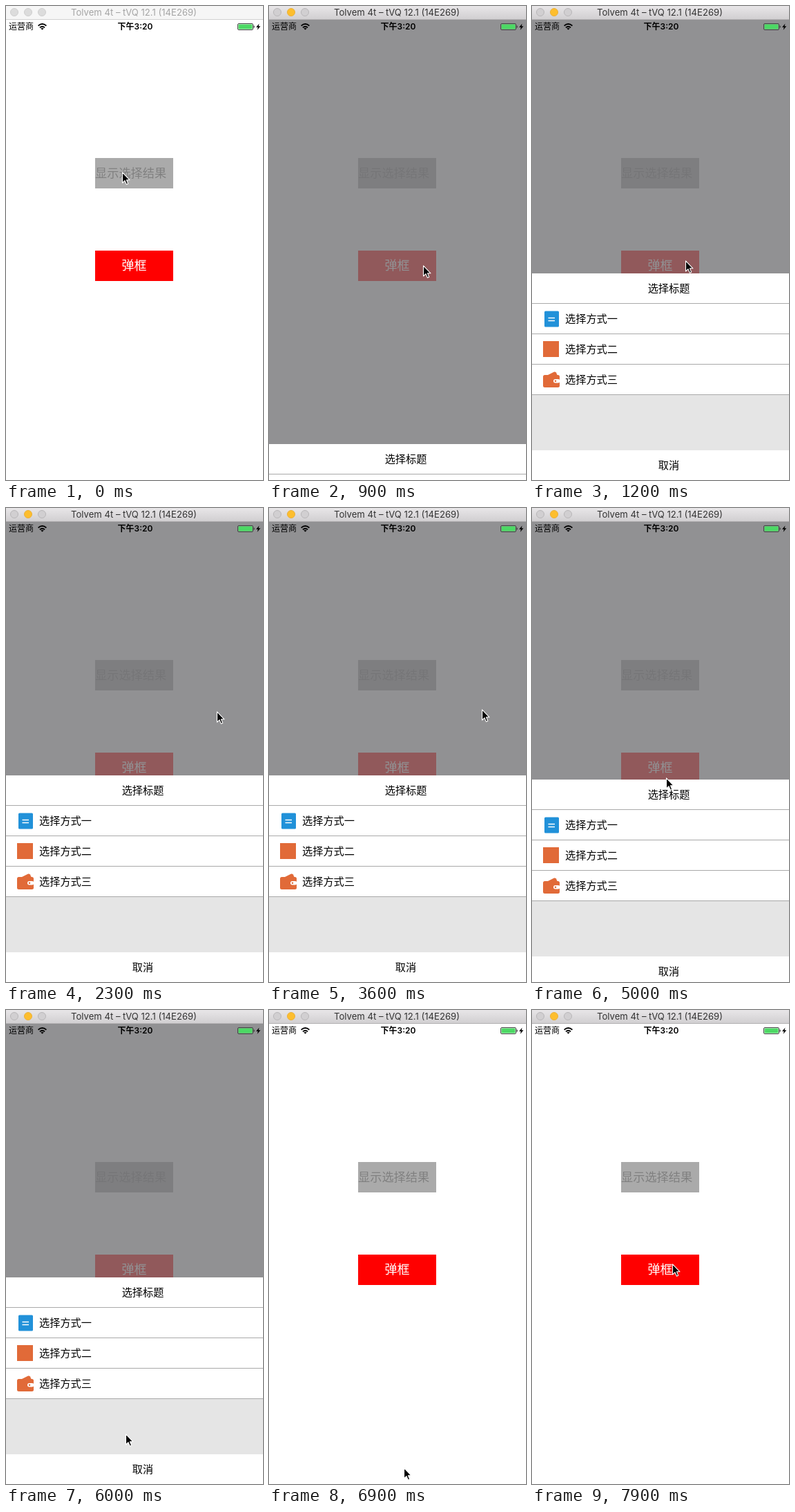
Write an HTML page that moves like this. It is 372 px wide and 686 px high and loops after 8000 ms.

```html
<!DOCTYPE html>
<html lang="zh-CN">
<head>
<meta charset="utf-8">
<title>Action sheet</title>
<style>
  html, body { margin: 0; width: 100%; height: 100%; overflow: hidden; background: #fff; }
  svg { display: block; width: 372px; height: 686px; }
  text { font-family: Inter, "Noto Sans CJK SC", "Noto Sans CJK", sans-serif; font-size: 15.2px; }
  .mid { text-anchor: middle; }
  .title { font-size: 13.1px; }
  .status { font-size: 12px; }
</style>
</head>
<body>
<svg viewBox="0 0 372 686">
  <defs>
    <linearGradient id="chrome" x2="0" y2="1">
      <stop stop-color="#e8e6e8"/>
      <stop offset="1" stop-color="#d0ced0"/>
    </linearGradient>
  </defs>
  <rect width="372" height="686" fill="#fff"/>

  <rect x="129" y="220" width="113" height="44" fill="#aaa"/>
  <text x="129" y="247.500" style="font-size:17.2px;font-weight:300" fill="#808080">显示选择结果</text>
  <rect x="129" y="354" width="113" height="44" fill="#f00"/>
  <text x="185.500" y="382" class="mid" style="font-size:18px;font-weight:300" fill="#fff">弹框</text>

  <rect id="dim" y="20" width="372" height="666" fill="#737375" opacity=".78"/>

  <g id="sheet">
    <rect width="372" height="299" fill="#e5e5e5"/>
    <rect width="372" height="176" fill="#fff"/>
    <rect y="256" width="372" height="43" fill="#fff"/>
    <g id="rows"></g>
    <text x="198" y="27" class="mid">选择标题</text>
    <text x="198" y="283" class="mid">取消</text>

    <rect x="18" y="54.500" width="21" height="23" rx="1.500" fill="#2191d9"/>
    <path d="M23.500 64.500h9.500M23.500 68.500h9.500" stroke="#fff" stroke-width="1.700"/>

    <rect x="16" y="98" width="23" height="23" fill="#e16a38"/>

    <g fill="#e16a38">
      <path d="M23 147L32 142.500Q34 142 35 143.500L36.500 147Z"/>
      <rect x="16" y="147" width="24" height="18" rx="2.500"/>
      <rect x="31" y="153" width="9.500" height="5.500" rx="2.700" fill="#fff"/>
      <circle cx="34" cy="155.700" r="1.300"/>
    </g>
  </g>

  <rect id="bar" width="372" height="20"/>
  <path id="edge" d="M0 19.500H372"/>
  <g id="lights"></g>
  <text id="title" x="185" y="14" class="mid title">Tolvem 4t – tVQ 12.1 (14E269)</text>

  <text x="4" y="34.300" class="status">运营商</text>
  <text x="187" y="34.300" class="mid status" font-weight="600">下午3:20</text>
  <g fill="none" stroke="#000" stroke-width="1.900">
    <path d="M46.600 28.600Q52.500 23.500 58.400 28.600M49 31.300Q52.500 28.300 56 31.300"/>
    <path d="M52.500 34.600L50.300 32.500Q52.500 31 54.700 32.500Z" fill="#000" stroke="none"/>
  </g>
  <rect x="335.500" y="25.500" width="22" height="9" rx="1.500" fill="none" stroke="#444"/>
  <rect x="336.500" y="26.500" width="20" height="7" rx=".5" fill="#4cd964"/>
  <path d="M358.500 28q1.500 .5 1.500 2t-1.500 2Z" fill="#444"/>
  <path d="M366.500 25.500L362 30.700H364.700L363.700 34.700L368.300 29.300H365.500Z"/>

  <path id="cursor" d="M.5 .8V16L4 12.700L6.400 18.200L8.700 17.200L6.500 11.800H11Z"
        stroke="#fff" stroke-width="1.100" stroke-linejoin="round"/>
</svg>
<script>
const LOOP = 8000, STEP = 100;
const SHEET_TOP = 387, SHEET_HEIGHT = 299, SLIDE = 300;
const ACTIVATE = 900;
const OPENINGS = [[820, 3700], [4725, 6800]];

// Cursor waypoints: time, x, y
const CURSOR = [
  [0, 168, 240], [700, 223, 375], [900, 223, 375], [1200, 222, 368], [1500, 222, 368],
  [2400, 308, 291], [3900, 308, 291], [4600, 188, 384], [4700, 188, 384],
  [5000, 194, 390], [5300, 194, 390], [6000, 173, 613], [6400, 195, 662],
  [6900, 195, 662], [7900, 203, 367]
];

const $ = id => document.getElementById(id);
const set = (el, attrs) => {
  for (const key in attrs) el.setAttribute(key, attrs[key]);
};
const add = (parent, tag, attrs, text = '') => {
  const el = document.createElementNS('http://www.w3.org/2000/svg', tag);
  set(el, attrs);
  el.textContent = text;
  return parent.appendChild(el);
};
const clamp = x => Math.min(1, Math.max(0, x));
const ease = p => p * p * (3 - 2 * p);

for (let i = 0; i < 4; i++) {
  const y = 43.5 + 44 * i;
  add($('rows'), 'path', { d: `M0 ${y}H372`, stroke: '#a9a9a9' });
  if (i < 3) add($('rows'), 'text', { x: 48, y: y + 27.5 }, '选择方式' + '一二三'[i]);
}
const lights = [12, 32, 52].map(cx => add($('lights'), 'circle', { cx, cy: 9, r: 5.5 }));

function cursorAt(t) {
  const next = CURSOR.findIndex(point => point[0] > t);
  if (next < 0) return CURSOR.at(-1).slice(1);
  const [t0, x0, y0] = CURSOR[next - 1];
  const [t1, x1, y1] = CURSOR[next];
  const p = ease((t - t0) / (t1 - t0));
  return [x0 + (x1 - x0) * p, y0 + (y1 - y0) * p];
}

function drawChrome(active) {
  set($('bar'), { fill: active ? 'url(#chrome)' : '#f6f6f6' });
  set($('edge'), { stroke: active ? '#b3b1b3' : '#d1d1d1' });
  set($('title'), { fill: active ? '#333' : '#a5a5a5' });
  lights.forEach((light, i) => {
    const yellow = active && i === 1;
    set(light, {
      fill: yellow ? '#fdbe2e' : active ? '#d1cfd1' : '#dcdcdc',
      stroke: yellow ? '#eab03a' : active ? '#b9b7b9' : '#cfcfcf'
    });
  });
}

function draw(t) {
  drawChrome(t >= ACTIVATE);
  const opening = OPENINGS.find(([start, end]) => t >= start && t < end);
  const display = opening ? 'inline' : 'none';
  set($('dim'), { display });
  set($('sheet'), { display });
  if (opening) {
    const left = 1 - ease(clamp((t - opening[0]) / SLIDE));
    set($('sheet'), { transform: `translate(0 ${Math.round(SHEET_TOP + SHEET_HEIGHT * left)})` });
  }
  const [x, y] = cursorAt(t);
  set($('cursor'), { transform: `translate(${Math.round(x)} ${Math.round(y)})` });
}

function tick() {
  const t = performance.now() % LOOP;
  draw(Math.floor(t / STEP) * STEP);
  requestAnimationFrame(tick);
}
tick();
</script>
</body>
</html>
```
